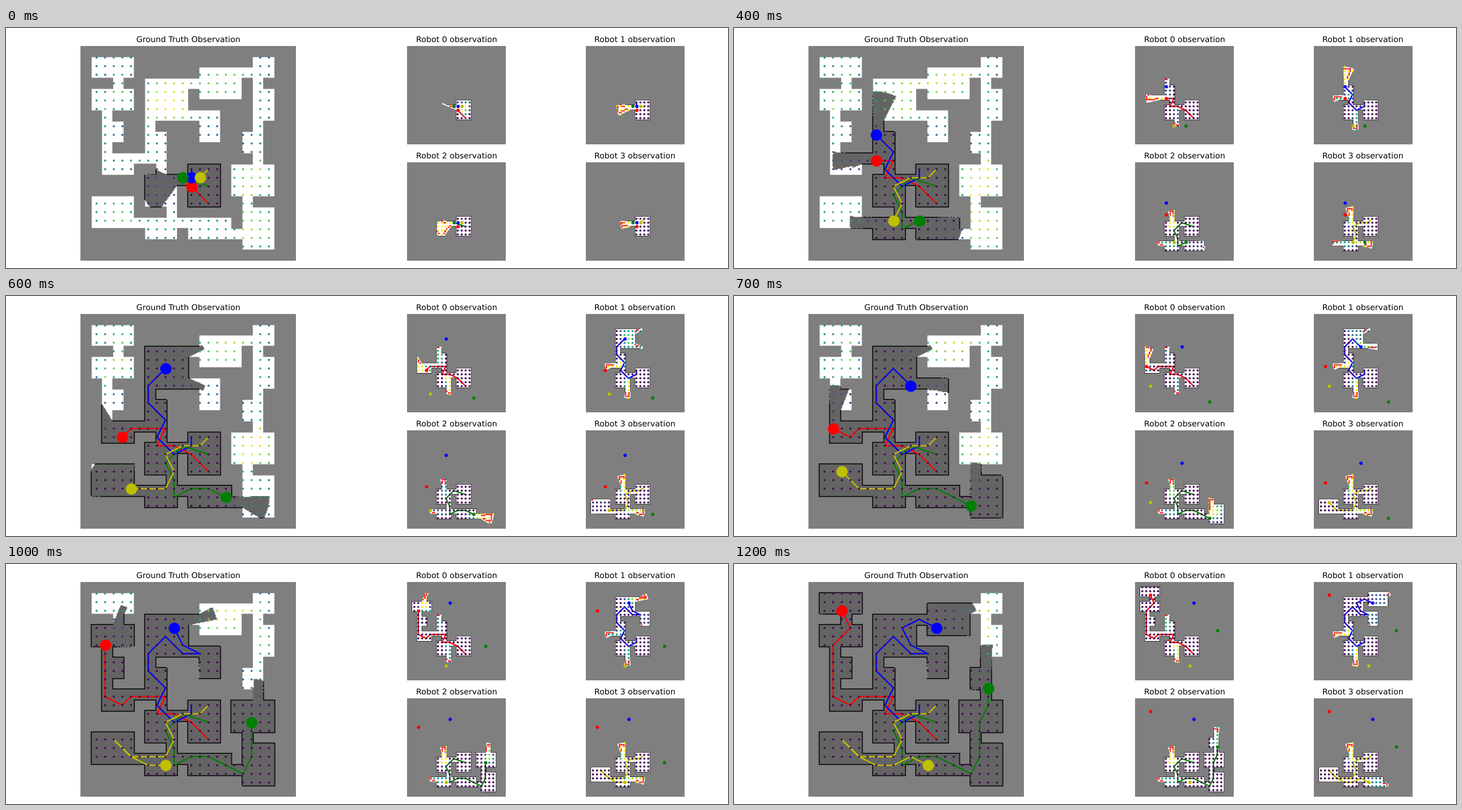
A matplotlib script for the animation above (1.3 s loop, 1280 by 427 pixels).

```python
import math

import numpy as np
import matplotlib.pyplot as plt
from matplotlib.animation import FuncAnimation

WIDTH, HEIGHT, DPI = 1280, 427, 64
STEPS = 13
SIZE = 250            # occupancy map is SIZE x SIZE pixels
CELL = 12.5           # halls are laid out on a 20 x 20 grid of cells
SENSOR_RANGE, UTILITY_RANGE = 50, 40
BLOCK = 4             # frontiers are searched in blocks of map pixels
UNKNOWN, EXPLORED, FLOOR, WALL = 127, 100, 255, 0
COLORS = "rbgy"

# Halls: column, row, width, height in cells
HALLS = {
    "A": (1, 1, 4, 2), "B": (1, 4, 4, 2), "D": (2, 7, 2, 2),
    "E": (2, 10, 3, 2), "G": (6, 3, 4, 4), "I": (6, 8, 2, 3),
    "K": (6, 12, 3, 3), "L": (10, 11, 3, 4), "N": (6, 16, 3, 2),
    "O": (10, 16, 4, 2), "P": (1, 14, 4, 3), "Q": (15, 15, 3, 4),
    "S": (14, 11, 4, 3), "U": (15, 8, 2, 2), "V": (16, 1, 2, 2),
    "W": (16, 4, 2, 3), "X": (11, 2, 4, 3), "Y": (11, 6, 2, 3),
}
# Doorways sit at the start of the side two halls share, or far along it
NEAR_DOORS = "BD DE EI GI GY GX XV VW WU SQ NO PN KL"
FAR_DOORS = "AB IK US OQ KN"

# Corners of each robot's route on the node lattice
ROUTES = [
    [(13, 17), (11, 15), (7, 14), (8, 12), (4, 12), (3, 13), (1, 12), (1, 6),
     (3, 4), (2, 2)],
    [(11, 13), (11, 14), (9, 15), (7, 13), (8, 11), (6, 9), (6, 7), (8, 5),
     (10, 7), (12, 7), (10, 6), (9, 4), (11, 3), (13, 4)],
    [(13, 15), (10, 14), (8, 16), (9, 20), (13, 19), (17, 21), (18, 19),
     (18, 15), (19, 11)],
    [(13, 13), (12, 14), (8, 15), (9, 17), (8, 19), (4, 19), (2, 17), (4, 19),
     (6, 20), (8, 20), (10, 19), (12, 20)],
]


def door_cell(first, second, along):
    """The one cell that joins two halls lying one cell apart."""
    door = []
    for axis in (0, 1):
        a, b = HALLS[first][axis], HALLS[second][axis]
        a_end, b_end = a + HALLS[first][axis + 2], b + HALLS[second][axis + 2]
        low, high = max(a, b), min(a_end, b_end) - 1
        apart = low > high
        door.append(high + 1 if apart else low + round(along * (high - low)))
    return door


def build_free():
    cells = np.zeros((20, 20), bool)
    for col, row, width, height in HALLS.values():
        cells[row:row + height, col:col + width] = True
    for doors, along in ((NEAR_DOORS, 0), (FAR_DOORS, 0.75)):
        for first, second in doors.split():
            col, row = door_cell(first, second, along)
            cells[row, col] = True
    # A map pixel is free only if the cells on both sides of it are
    centre = np.arange(SIZE) + 0.5
    sides = [((centre + d) / CELL).astype(int) for d in (-0.01, 0.01)]
    return np.all([cells[np.ix_(r, c)] for r in sides for c in sides], axis=0)


FREE = build_free()
ANGLES = np.radians(np.arange(0, 360, 0.5))[:, None]


def scan(node, reach=SENSOR_RANGE):
    """Cast rays from a node; return masks of seen floor and seen wall."""
    dist = np.arange(0, reach + 0.25, 0.5)
    x = (node[0] + 0.5 + dist * np.cos(ANGLES)).clip(0, SIZE - 1).astype(int)
    y = (node[1] + 0.5 + dist * np.sin(ANGLES)).clip(0, SIZE - 1).astype(int)
    clear = np.logical_and.accumulate(FREE[y, x], axis=1)
    hit = np.zeros_like(clear)
    hit[:, 1:] = clear[:, :-1] & ~clear[:, 1:]
    seen = np.zeros((2, SIZE, SIZE), bool)
    seen[0, y[clear], x[clear]] = True
    seen[1, y[hit], x[hit]] = True
    return seen


def lattice(col, row):
    return 18 + 10 * col, 13 + 10 * row


def walk(corners):
    """Split each leg into strides of about two nodes, snapped to nodes."""
    path = [lattice(*corners[0])]
    for (c0, r0), (c1, r1) in zip(corners, corners[1:]):
        strides = max(1, max(abs(c1 - c0), abs(r1 - r0)) // 2)
        for k in range(1, strides + 1):
            col = c0 + (c1 - c0) * k / strides
            row = r0 + (r1 - r0) * k / strides
            path.append(lattice(math.floor(col + 0.5), math.ceil(row - 0.5)))
    return path


def find_frontier(belief):
    """Corners of fully known floor blocks that touch unknown blocks."""
    pad = -SIZE % BLOCK
    count = (SIZE + pad) // BLOCK
    blocks = np.pad(belief, (0, pad), constant_values=UNKNOWN)
    blocks = blocks.reshape(count, BLOCK, count, BLOCK).min(axis=(1, 3))
    unknown = (blocks == UNKNOWN).astype(int)
    around = sum(np.roll(unknown, (dy, dx), (0, 1))
                 for dy in (-1, 0, 1) for dx in (-1, 0, 1))
    y, x = np.nonzero((blocks == FLOOR) & (around > 1) & (around < 8))
    return x * BLOCK, y * BLOCK


NODES = np.array([n for n in (lattice(i, j) for j in range(23)
                              for i in range(21)) if FREE[n[1], n[0]]])
VIEW = np.array([scan(n, UTILITY_RANGE)[0].ravel() for n in NODES],
                np.float32)
PATHS = np.array([walk(corners) for corners in ROUTES])
BELIEFS = [np.logical_or.accumulate([scan(p) for p in path], axis=0)
           for path in PATHS]


class Panel:
    def __init__(self, fig, centre, top, side, title, owners, robot_size):
        self.ax = fig.add_axes([(centre - side / 2) / WIDTH,
                                1 - (top + side) / HEIGHT,
                                side / WIDTH, side / HEIGHT])
        self.ax.set_title(title, fontsize=16, pad=8)
        self.owners = owners
        self.image = self.ax.imshow(np.zeros((SIZE, SIZE)), cmap="gray",
                                    vmin=0, vmax=255, aspect="auto",
                                    extent=(0, SIZE, SIZE, 0))
        self.lines = [self.ax.plot([], [], COLORS[k], lw=2.667, zorder=2)[0]
                      for k in owners]
        self.nodes = self.ax.scatter([], [], s=17, c=[], cmap="viridis",
                                     linewidths=0, zorder=3)
        self.frontier = self.ax.scatter([], [], s=9, color="r",
                                        linewidths=0, zorder=4)
        self.robots = [self.ax.plot([], [], "o", color=c, ms=robot_size,
                                    mew=0, zorder=5)[0] for c in COLORS]
        self.ax.set(xlim=(0, SIZE), ylim=(SIZE, 0))
        self.ax.axis("off")

    def show(self, picture, shown, utility, step):
        self.image.set_data(picture)
        self.nodes.set_offsets(NODES[shown] + 0.5)
        self.nodes.set_array(utility[shown])
        self.nodes.set_clim(0, max(utility[shown].max(), 1))
        for k, line in zip(self.owners, self.lines):
            line.set_data(*(PATHS[k, :step + 1].T + 0.5))
        for path, robot in zip(PATHS, self.robots):
            robot.set_data(*(path[step:step + 1].T + 0.5))


plt.rcParams["font.family"] = "DejaVu Sans"
plt.rcParams["text.hinting"] = "none"
fig = plt.figure(figsize=(WIDTH / DPI, HEIGHT / DPI), dpi=DPI,
                 facecolor="white")
truth = Panel(fig, 323.2, 32, 381.9, "Ground Truth Observation", range(4),
              22.6)
views = [Panel(fig, 798.4 + 316.8 * (k % 2), 32 + 207 * (k // 2), 174.9,
               f"Robot {k} observation", [k], 6.8) for k in range(4)]


def update(frame):
    step = frame + 1
    floor, wall = np.any([belief[step] for belief in BELIEFS], axis=0)
    picture = np.where(FREE, FLOOR, UNKNOWN)
    picture[floor] = EXPLORED
    picture[wall] = WALL
    unexplored = (FREE & ~floor).ravel().astype(np.float32)
    truth.show(picture, np.ones(len(NODES), bool), VIEW @ unexplored, step)

    for view, belief in zip(views, BELIEFS):
        floor, wall = belief[step]
        picture = np.full((SIZE, SIZE), UNKNOWN)
        picture[floor] = FLOOR
        picture[wall] = WALL
        x, y = find_frontier(picture)
        utility = VIEW[:, y * SIZE + x].sum(axis=1)
        view.show(picture, floor[NODES[:, 1], NODES[:, 0]], utility, step)
        view.frontier.set_offsets(np.column_stack([x, y]) + 0.5)
    return []


anim = FuncAnimation(fig, update, frames=STEPS, interval=100, repeat=True)
plt.show()
```
